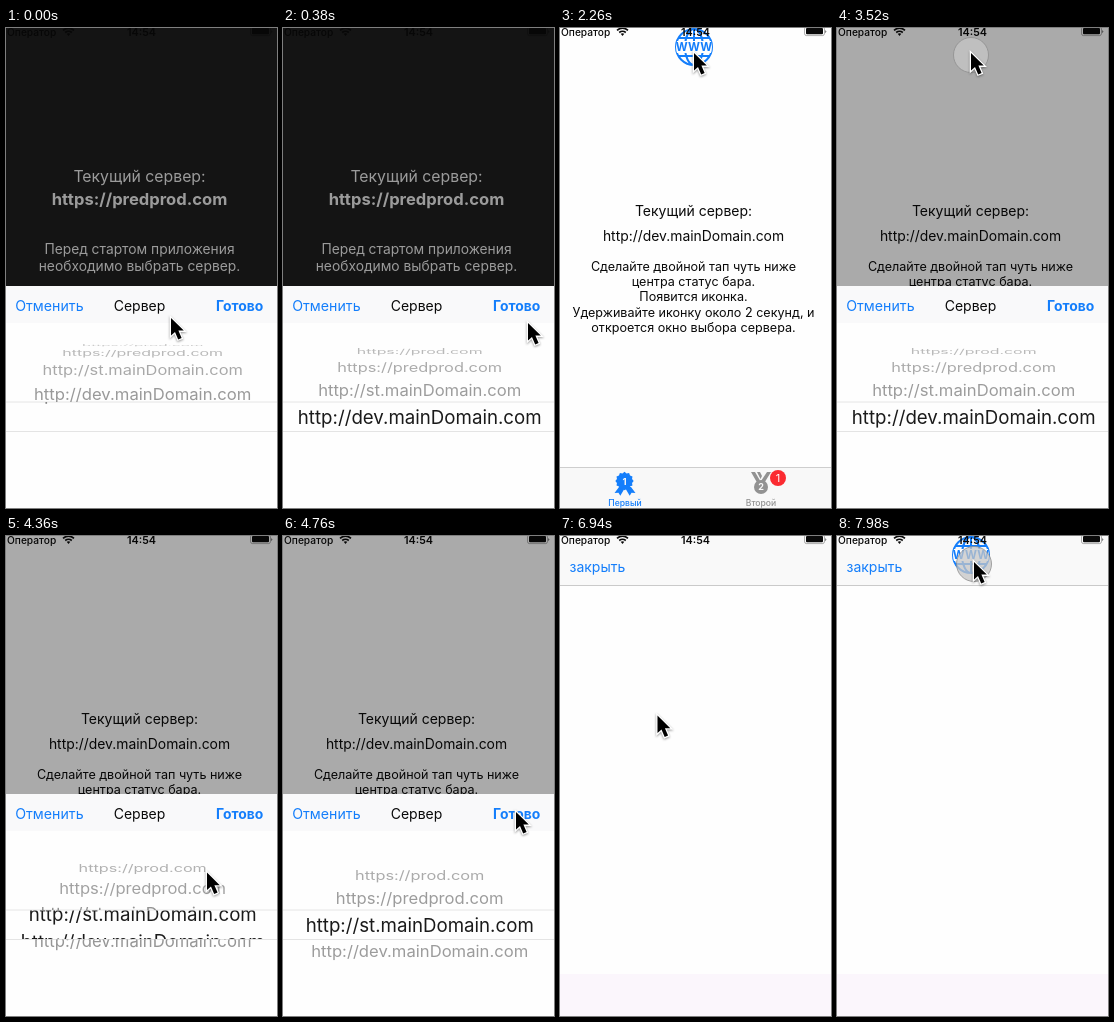
Animation of 271x480 px, one loop 8000 ms. Source, as an HTML page:

```html
<!DOCTYPE html>
<html lang="ru">
<head>
<meta charset="utf-8">
<title>Выбор сервера</title>
<style>
html, body { margin: 0; width: 100%; height: 100%; overflow: hidden; background: #fff; }
svg { display: block; width: 100vw; height: 100vh; }
text { font-family: Inter, "Open Sans", sans-serif; font-optical-sizing: none; }
.mid { text-anchor: middle; }
.blue { fill: #147efb; }
.bold { font-weight: 600; }
#cursor { paint-order: stroke; filter: drop-shadow(0.5px 1.2px 1px rgba(0, 0, 0, .4)); }
</style>
</head>
<body>
<svg viewBox="0 0 271 480" xmlns="http://www.w3.org/2000/svg">
  <defs>
    <clipPath id="lens"><rect y="374.5" width="271" height="28.5"/></clipPath>
    <clipPath id="outer"><path d="M0 296H271V374H0ZM0 403.5H271V480H0Z"/></clipPath>
    <clipPath id="disc"><circle cx="134" cy="19" r="18"/></clipPath>
  </defs>
  <rect width="271" height="480" fill="#fefefe"/>

  <g id="first" class="mid" fill="#0a0a0a">
    <text x="133.5" y="188" font-size="14">Текущий сервер:</text>
    <text id="url" x="133.5" y="212.5" font-size="13.9"></text>
    <g font-size="12.6">
      <text x="133.5" y="242.5">Сделайте двойной тап чуть ниже</text>
      <text x="133.5" y="258">центра статус бара.</text>
      <text x="133.5" y="273">Появится иконка.</text>
      <text x="133.5" y="288.5">Удерживайте иконку около 2 секунд, и</text>
      <text x="133.5" y="303.5">откроется окно выбора сервера.</text>
    </g>
  </g>
  <text id="second" class="mid blue" x="133.5" y="230.5" font-size="12.6">Показать модальное окно</text>

  <g id="tabs">
    <rect y="439" width="271" height="41" fill="#f8f8f8"/>
    <path d="M0 439.5H271" stroke="#c4c4c4" stroke-width=".8"/>
    <g id="tab1" class="mid">
      <path d="M59 459l-4.5 6 4-.2 1.8 3 3.7-6.3h2l3.7 6.3 1.8-3 4 .2-4.5-6Z"/>
      <path id="rosette"/>
      <text x="64.5" y="456.5" font-size="9.5" font-weight="700" fill="#f8f8f8">1</text>
      <text x="65" y="478" font-size="8.6" font-weight="500">Первый</text>
    </g>
    <g id="tab2" class="mid">
      <path d="M191 444h4l5 8.5-3 2ZM211 444h-4l-8 12 4 1ZM197 444h3l2 4-1.5 3Z"/>
      <circle cx="201" cy="459" r="7"/>
      <text x="201" y="462.3" font-size="9" font-weight="700" fill="#f8f8f8">2</text>
      <text x="201" y="478" font-size="8.6" font-weight="500">Второй</text>
    </g>
    <circle cx="218" cy="450" r="8" fill="#fb2b31"/>
    <text class="mid" x="218" y="454" font-size="11" fill="#fff">1</text>
  </g>

  <g id="modal">
    <rect width="271" height="480" fill="#fefefe"/>
    <rect y="438" width="271" height="42" fill="#fbf6fc"/>
    <rect width="271" height="49" fill="#f9f9f9"/>
    <path d="M0 49.5H271" stroke="#bdbdbd" stroke-width=".8"/>
    <text class="blue" x="9.5" y="36" font-size="14">закрыть</text>
  </g>

  <g id="start" class="mid" fill="#e8e8e8">
    <rect width="271" height="480" fill="#1e1e1e"/>
    <text x="133.5" y="154" font-size="15.8">Текущий сервер:</text>
    <text x="133.5" y="176.5" font-size="16.6" font-weight="700">https://predprod.com</text>
    <text x="133.5" y="226" font-size="13.8">Перед стартом приложения</text>
    <text x="133.5" y="242.5" font-size="13.85">необходимо выбрать сервер.</text>
  </g>

  <g id="globe" fill="none" stroke="#147efb" stroke-width="2">
    <circle cx="134" cy="19" r="18"/>
    <g clip-path="url(#disc)">
      <ellipse cx="134" cy="19" rx="9" ry="18"/>
      <path d="M134 1V37M116 10H152M116 28H152"/>
      <rect x="114" y="13" width="40" height="12" fill="#fefefe" stroke="none"/>
    </g>
    <text class="mid" x="134" y="23" font-size="11.5" font-weight="700" fill="#147efb" stroke="none">WWW</text>
  </g>

  <g fill="#0a0a0a">
    <text x="1" y="7.5" font-size="10.2" font-weight="500">Оператор</text>
    <path d="M57 2.3Q62.5-2 68 2.3M59.2 4.5Q62.5 2 65.8 4.5" fill="none" stroke="#0a0a0a" stroke-width="1.7"/>
    <path d="M60.7 5.8Q62.5 4.5 64.3 5.8L62.5 8Z"/>
    <text class="mid bold" x="135.5" y="7.5" font-size="10.8">14:54</text>
    <rect x="244.5" y="-1" width="20" height="8.6" rx="2" fill="none" stroke="#0a0a0a" stroke-opacity=".4" stroke-width=".8"/>
    <rect x="246" y="0" width="17" height="6.3" rx="1"/>
    <path d="M265.5 2q1.6 1.5 0 3.2Z"/>
  </g>

  <rect id="dim" width="271" height="480"/>
  <g id="sheet">
    <rect y="258" width="271" height="222" fill="#fefefe"/>
    <rect y="258" width="271" height="37" fill="#f9f9fa"/>
    <text class="blue" x="9.2" y="283" font-size="14.2">Отменить</text>
    <text class="mid" x="133.5" y="283" font-size="14" fill="#0a0a0a">Сервер</text>
    <text class="blue" x="257.3" y="283" font-size="13.9" font-weight="700" text-anchor="end">Готово</text>
    <path d="M0 374H271M0 403.5H271" stroke="#dedede" stroke-width=".8"/>
    <g id="dimRows" class="mid" clip-path="url(#outer)" font-size="18.6" fill="#333"></g>
    <g id="bigRows" class="mid" clip-path="url(#lens)" font-size="18.7" fill="#1a1a1a"></g>
  </g>

  <circle id="touch" r="17.5" fill="#c6c6c6" fill-opacity=".75" stroke="#8e8e8e" stroke-width=".8"/>
  <path id="cursor" d="M0 0V17.5L4 13.9 7.2 21.4 10.6 20 7.4 12.6H12.8Z" stroke="#fff" stroke-width="2.6"/>
</svg>

<script>
const LOOP = 8000, STEP = 0.38, RADIUS = 72, MID = 389;
const $ = id => document.getElementById(id);
const servers = ["https://prod.com", "https://predprod.com", "http://st.mainDomain.com", "http://dev.mainDomain.com"];

const clamp = v => Math.max(0, Math.min(1, v));
const part = (t, a, b) => clamp((t - a) / (b - a));
const smooth = u => u * u * (3 - 2 * u);
const easeOut = u => 1 - (1 - u) ** 3;
const within = (t, a, b) => t >= a && t < b;
const show = (id, on) => $(id).setAttribute("display", on ? "inline" : "none");
const move = (id, x, y) => $(id).setAttribute("transform", `translate(${x} ${y})`);

// time, x, y of the pointer tip
const path = [
  [0, 165, 290], [360, 245, 295], [380, 245, 295], [460, 236, 277],
  [1020, 236, 277], [1260, 117, 142], [1480, 117, 142], [1800, 134, 25],
  [3760, 134, 25], [4060, 200, 309], [4120, 200, 309], [4380, 201, 337],
  [4580, 201, 337], [4760, 233, 276], [5280, 233, 276], [5580, 199, 453],
  [5900, 199, 453], [6260, 123, 233], [6820, 123, 233], [7180, 26, 30],
  [7220, 26, 30], [7500, 137, 26]
];
const presses = [
  [480, 560], [1840, 1920], [2020, 2100], [2300, 3760], [4940, 5000],
  [5720, 5800], [6400, 6480], [7760, 7820], [7900, LOOP]
];

function pointer(t) {
  const i = path.findIndex(k => k[0] > t);
  if (i < 0) return path[path.length - 1].slice(1);
  const [a, x, y] = path[i - 1], [b, x2, y2] = path[i];
  const u = smooth(part(t, a, b));
  return [x + (x2 - x) * u, y + (y2 - y) * u];
}

function addRows(id) {
  return servers.map(name => {
    const row = document.createElementNS("http://www.w3.org/2000/svg", "text");
    row.textContent = name;
    row.setAttribute("y", 6.5);
    $(id).append(row);
    return row;
  });
}
const dimRows = addRows("dimRows"), bigRows = addRows("bigRows");

// Rows sit on a drum; the band in the middle shows them larger and darker.
function wheel(pos) {
  servers.forEach((_, i) => {
    const a = (i - pos) * STEP, y = MID + RADIUS * Math.sin(a);
    const c = Math.max(Math.cos(a), 0.01);
    const seen = Math.abs(a) < 1.55;
    const w = 0.9 - 0.035 * a * a;
    dimRows[i].setAttribute("transform", `translate(136.7 ${y}) scale(${w} ${0.92 * c})`);
    dimRows[i].setAttribute("opacity", seen ? 0.56 - 0.2 * Math.abs(a) : 0);
    bigRows[i].setAttribute("transform", `translate(136.7 ${y}) scale(1 ${c})`);
    bigRows[i].setAttribute("opacity", seen ? 1 : 0);
  });
}

function rosette() {
  let d = "";
  for (let i = 0; i < 24; i++) {
    const a = i * Math.PI / 12, r = i % 2 ? 7.8 : 9.2;
    d += `${i ? "L" : "M"}${64.5 + r * Math.cos(a)} ${453 + r * Math.sin(a)}`;
  }
  $("rosette").setAttribute("d", d + "Z");
}

function draw(t) {
  const second = t >= 5720;
  show("first", !second);
  show("second", second);
  $("url").textContent = servers[t < 4940 ? 3 : 2];
  $("tab1").setAttribute("fill", second ? "#929292" : "#147efb");
  $("tab2").setAttribute("fill", second ? "#147efb" : "#929292");

  show("start", t < 780);
  $("start").setAttribute("opacity", 1 - part(t, 660, 780));
  show("modal", t >= 6460);
  move("modal", 0, 480 * (1 - easeOut(part(t, 6460, 6920))));
  show("globe", within(t, 2100, 3520) || t >= 7960);

  const down = t < 1000 ? smooth(part(t, 500, 680)) : smooth(part(t, 4940, 5040));
  const open = t < 680 || within(t, 3520, 5040);
  show("sheet", open);
  show("dim", open);
  move("sheet", 0, 222 * down);
  $("dim").setAttribute("opacity", 0.335 * (1 - down));
  wheel(t < 1000 ? 3 + 0.855 * (1 - easeOut(part(t, 20, 370))) : 3 - smooth(part(t, 4120, 4540)));

  const [x, y] = pointer(t);
  move("cursor", x, y);
  move("touch", x, y + 2);
  show("touch", presses.some(p => within(t, p[0], p[1])));
}

rosette();
draw(0);
const begin = performance.now();
(function tick() {
  draw((performance.now() - begin) % LOOP);
  requestAnimationFrame(tick);
})();
</script>
</body>
</html>
```
